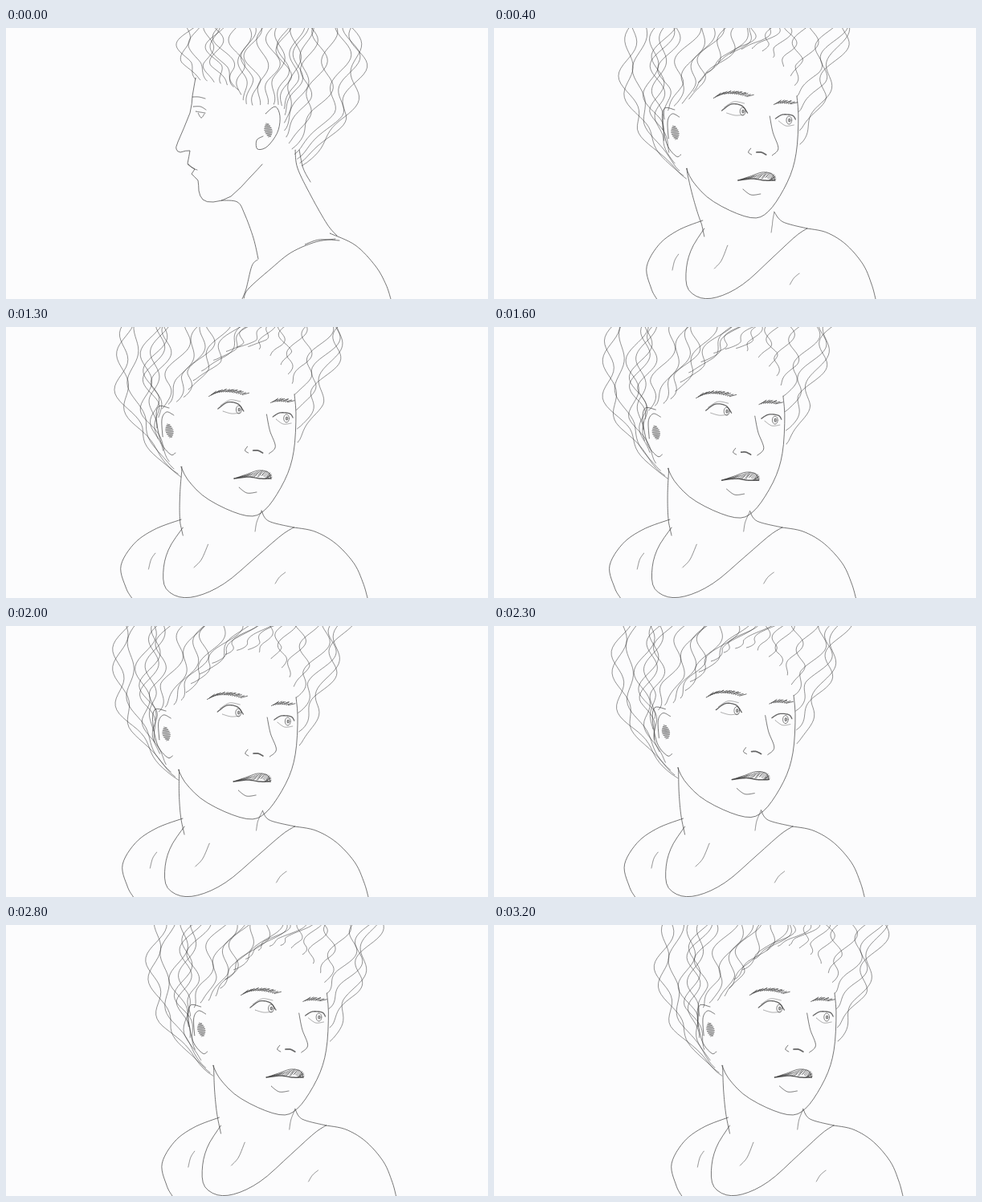
An HTML page with a canvas for the animation above (3.3 s loop, 600 by 338 pixels).

```html
<!DOCTYPE html>
<html lang="en">
<head>
<meta charset="utf-8">
<title>Pencil portrait</title>
<style>
html, body { margin: 0; width: 100%; height: 100%; overflow: hidden; background: #fcfcfd; }
canvas { display: block; width: 600px; height: 338px; }
</style>
</head>
<body>
<canvas id="stage" width="600" height="338"></canvas>
<script>
const LOOP = 3300, STEP = 100, SAMPLES = 32, STRANDS = 28, TURN_END = 400;
const ctx = document.getElementById('stage').getContext('2d');

const mix = (a, b, u) => a + (b - a) * u;
const mixAll = (a, b, u) => a.map((v, i) => Array.isArray(v) ? mixAll(v, b[i], u) : mix(v, b[i], u));
const clamp = v => Math.max(0, Math.min(1, v));
const rnd = n => { const v = Math.sin(n * 127.1 + 4.7) * 43758.5453; return v - Math.floor(v); };
const points = text => text.split(' ').map(p => p.split(',').map(Number));

// Catmull-Rom point at s in 0..1
function along(pts, s) {
  const last = pts.length - 1, at = i => pts[Math.max(0, Math.min(last, i))];
  const i = Math.min(last - 1, Math.floor(s * last)), f = s * last - i;
  const [a, b, c, d] = [at(i - 1), at(i), at(i + 1), at(i + 2)];
  return [0, 1].map(j => b[j] + f * ((c[j] - a[j]) / 2 +
    f * (a[j] - 2.5 * b[j] + 2 * c[j] - d[j] / 2 +
    f * (1.5 * (b[j] - c[j]) + (d[j] - a[j]) / 2))));
}
const sample = (fn, n = SAMPLES) => Array.from({ length: n + 1 }, (_, i) => fn(i / n));
const curve = text => { const pts = points(text); return sample(s => along(pts, s)); };

// Side view; strokes share their names with the three-quarter view
const profile = {
  jaw: curve('236,62 232,85 229,106 214,142 212,151 217,155 229,153 226,169 235,176 231,182 239,190 240,203 245,214 258,217 280,210 304,186 319,170'),
  neckL: curve('268,215 288,217 297,232 308,262 314,288'),
  neckR: curve('360,152 363,175 380,210 400,245 412,259'),
  collar: curve('296,337 302,325 330,300 355,280 385,267 410,263'),
  shoulderL: curve('313,289 306,297 299,325 294,338'),
  shoulderR: curve('403,256 435,271 460,297 473,320 479,338'),
  spots: points('230,106 242,108 226,87 232,87 218,152 227,174 326,127'),
  hairline: curve('236,64 262,68 288,76 300,95 330,95 346,100 347,130 358,155 368,172'),
  crown: [222, 433, 12, 28]
};
const profileExtras = [
  '236,104 242,105 248,106', '239,106 243,112 247,107', '233,98 242,98 249,102', '226,170 233,175 238,177',
  '323,107 335,98 341,110 338,130 325,148 313,151 312,140 320,135',
  '372,270 390,264 415,265', '365,152 370,175 379,192', '232,86 240,86 248,88'
].map(curve);

// Three-quarter view. spots: eyes, brows, nose, mouth, ear shading
// crown: hair ends left and right, bulge left and right
const front = {
  jaw: curve('238,175 247,192 268,213 300,230 327,237 344,229 360,208 374,180 381,150 383,110 381,85'),
  neckL: curve('239,175 240,205 243,235 248,260'),
  neckR: curve('341,229 350,242 380,250'),
  collar: curve('248,250 232,275 225,300 227,325 245,337 270,334 300,318 335,287 365,260 380,250'),
  shoulderL: curve('246,240 215,252 190,270 174,298 180,325 187,338'),
  shoulderR: curve('380,250 405,255 430,270 452,295 463,320 468,338'),
  spots: points('311,104 371,115 273,84 351,92 335,156 305,190 223,130'),
  hairline: curve('238,188 225,172 208,135 215,102 240,90 258,62 298,30 335,28 370,55 382,90 385,145'),
  crown: [165, 443, 32, 0]
};
const ear = curve('223,102 210,100 207,115 213,145 225,160 231,158');
const innerEar = curve('215,138 214,116 220,107 229,111');
const bridge = curve('349,159 357,150 350,130 346,110');
const throat = curve('341,230 336,243 334,255');
const folds = ['278,271 270,290 261,300', '215,282 210,290 207,302', '370,306 363,312 358,320'].map(curve);

// time, head shift at its left and right edge, head drop, body shift left and right
const poses = [
  [400, 2, -4, 0, 16, 7],
  [800, -12, -18, 0, -30, -10],
  [1300, -20, -22, -1, -31, -18],
  [2000, -24, -20, 4, -29, -17],
  [2500, 0, 0, 0, 0, 0],
  [3200, 46, 43, 0, 47, 41]
];
function poseAt(t) {
  const i = Math.max(1, poses.findIndex(p => p[0] >= t));
  const [a, b] = [poses[i - 1], poses[i]];
  return mixAll(a, b, clamp((t - a[0]) / (b[0] - a[0])));
}

const lids = {
  left: ['-26,-1 -14,-9 -1,-7 6,2', '-20,2 -9,5 2,4', '-23,-5 -11,-12 2,-10'].map(curve),
  right: ['-17,-2 -8,-7 4,-6 8,-1', '-13,1 -4,7 6,6'].map(curve)
};
const nostrils = ['-13,-6 -16,-1 -12,2', '-6,-1 0,-1 6,2'].map(curve);
const upperLip = curve('0,0 15,-5 30,-10 42,-8 46,0');
const lipLine = curve('0,0 18,-2 32,0 46,0');
const chin = curve('6,11 16,18 28,17');

function line(pts, width = 1, shade = .66) {
  ctx.lineWidth = width;
  ctx.strokeStyle = `rgba(50,50,50,${shade})`;
  ctx.beginPath();
  pts.forEach(p => ctx.lineTo(p[0], p[1]));
  ctx.stroke();
}
function oval(x, y, rx, ry, width = .9) {
  ctx.lineWidth = width;
  ctx.strokeStyle = 'rgba(50,50,50,.6)';
  ctx.beginPath();
  ctx.ellipse(x, y, rx, ry, 0, 0, 7);
  ctx.stroke();
}
function place([x, y], sx, paint) {
  ctx.save();
  ctx.translate(x, y);
  ctx.scale(sx, 1);
  paint();
  ctx.restore();
}

function brow(width, rise) {
  for (let x = 0; x < width - 7; x += 2.6) {
    const p = x / width, y = 1 - rise * Math.sin(Math.PI * p ** .8) + 2 * p;
    line([[x, y + 2.5 - p], [x + 6 + 3 * rnd(x), y - 2.5 + 2 * p + rnd(x + 9)]], 1, .7);
  }
}
function eye(shape) {
  shape.forEach((s, i) => line(s, i ? .8 : 1.3, i ? .5 : .75));
  oval(0, 0, 3.4, 5, 1);
  oval(.4, 0, 1, 1.8, 1.5);
}
function mouth() {
  line(upperLip);
  for (let i = 4; i < SAMPLES - 2; i++) {
    const [x, y] = upperLip[i];
    line([[x - 3, mix(y, lipLine[i][1], .5 + .5 * rnd(i))], [x + 2, y + rnd(i + 50)]], .9, .6);
  }
  line(lipLine, 1.5, .8);
  line(chin);
}
function scribble([x, y]) {
  line(sample(p => {
    const w = 1.5 + 3.5 * Math.sin(Math.PI * p), side = Math.round(p * 16) % 2 ? 1 : -1;
    return [x + side * w + p * 3 - 1, y - 8 + p * 17];
  }, 16), .9, .55);
}

// Wavy strands rise from the hairline to the top edge and drift with time
function hair(roots, [left, right, bulgeL, bulgeR], t) {
  for (let i = 0; i < STRANDS; i++) {
    const s = i / (STRANDS - 1), side = 2 * s - 1;
    const [x0, y0] = along(roots, s);
    const x1 = mix(left, right, s) + 24 * (rnd(i) - .5);
    const bulge = side * Math.abs(side) * (side < 0 ? bulgeL : bulgeR);
    const amp = 6 + 5 * rnd(i + 40), waves = .5 + y0 / 95;
    const phase = 6.28 * rnd(i + 80) + t / 500;
    line(sample(p => [
      mix(x0, x1, p ** .75) + bulge * Math.sin(Math.PI * p) +
        amp * Math.min(1, p * 3) * Math.sin(6.28 * waves * p + phase),
      mix(y0, -2, p)
    ], 40), .95, .55);
  }
}
function bubbles() {
  line(points('519,250 519,256 521,259 526,259'), .9, .55);
  oval(528, 271, 5.5, 7);
  oval(532, 287, 5.5, 5.5);
  oval(534, 301, 3.2, 5);
  oval(544, 312.5, 2.8, 2.2);
}

function draw(t) {
  const [, headL, headR, drop, bodyL, bodyR] = poseAt(t);
  const turn = clamp(t / TURN_END);
  const onHead = ([x, y]) => [x + mix(headL, headR, (x - 220) / 160), y + drop];
  const onBody = ([x, y]) => [x + mix(bodyL, bodyR, (x - 174) / 294), y];
  const onNeck = p => mixAll(onHead(p), onBody(p), clamp((p[1] - 180) / 65));
  const part = (name, move) => mixAll(profile[name], front[name].map(move), turn);

  ctx.fillStyle = '#fcfcfd';
  ctx.fillRect(0, 0, 600, 338);
  ctx.lineCap = ctx.lineJoin = 'round';

  const crown = mixAll(profile.crown, front.crown, turn);
  crown[0] += headL * turn;
  crown[1] += headR * turn;
  hair(part('hairline', onHead), crown, t);

  line(part('jaw', onHead));
  for (const name of ['neckL', 'neckR']) line(part(name, onNeck));
  for (const name of ['collar', 'shoulderL', 'shoulderR']) line(part(name, onBody));

  const spots = part('spots', onHead);
  if (!turn) {
    profileExtras.forEach(s => line(s));
    scribble(spots[6]);
  } else {
    place(spots[0], turn, () => eye(lids.left));
    place(spots[1], turn, () => eye(lids.right));
    place(spots[2], turn, () => brow(51, 6));
    place(spots[3], turn, () => brow(30, 2));
    place(spots[4], 2 * turn - 1, () => nostrils.forEach((s, i) => line(s, i ? 1.7 : 1, .75)));
    place(spots[5], turn, mouth);
  }
  if (turn === 1) {
    [ear, innerEar, bridge].forEach(s => line(s.map(onHead)));
    line(throat.map(onNeck), .9, .6);
    folds.forEach(s => line(s.map(onBody), .9, .6));
    scribble(spots[6]);
  }
  if (t >= 2400 && t < 2700) bubbles();
}

const start = performance.now();
let shown = -1;
function tick() {
  const t = Math.floor((performance.now() - start) % LOOP / STEP) * STEP;
  if (t !== shown) draw(shown = t);
  requestAnimationFrame(tick);
}
tick();
</script>
</body>
</html>
```
